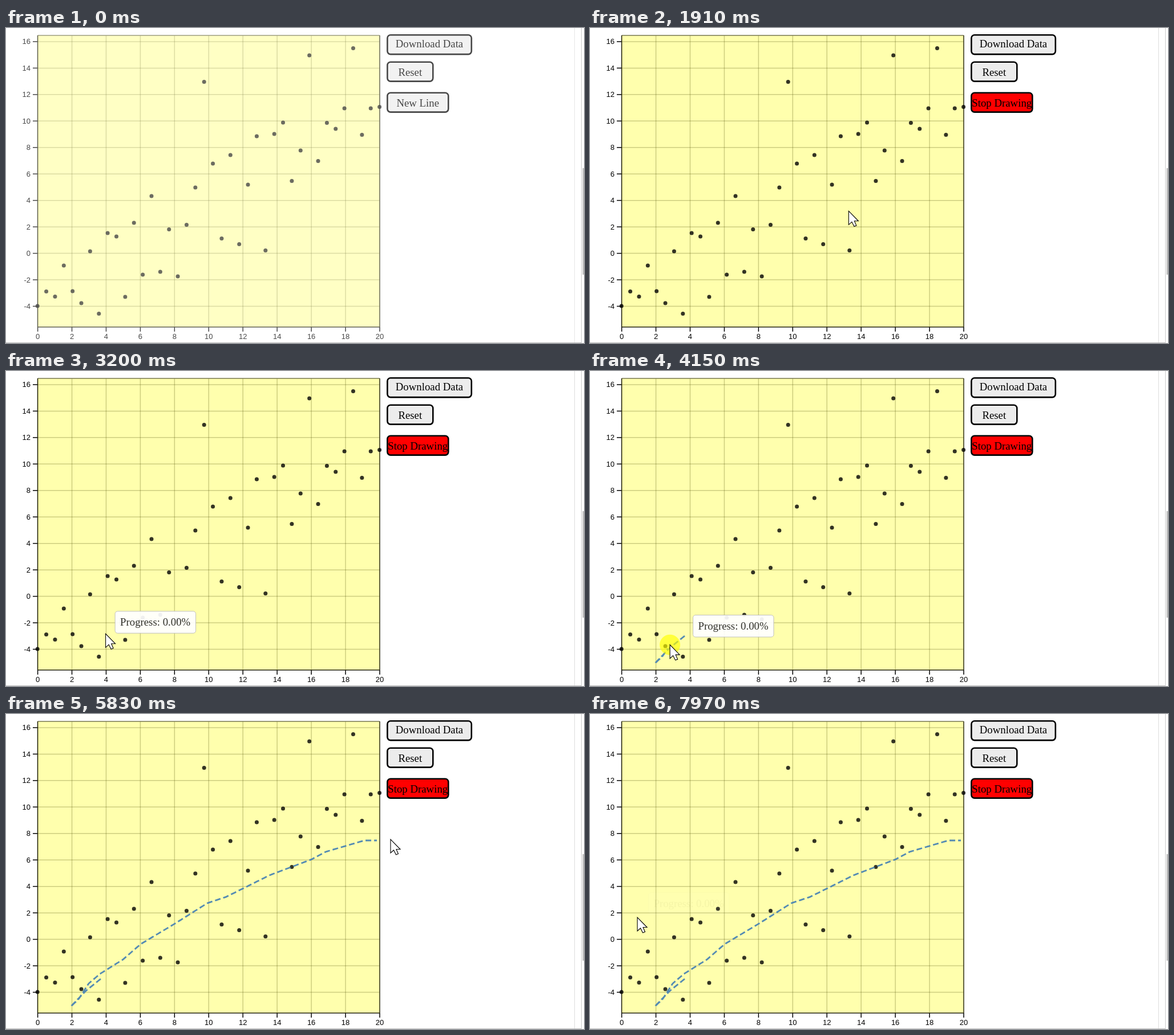
An HTML page for the animation above (8 s loop, 1013 by 553 pixels).

```html
<!DOCTYPE html>
<html lang="en">
<head>
<meta charset="utf-8">
<title>Draw a line</title>
<style>
  html, body { margin: 0; width: 100%; height: 100%; overflow: hidden; background: #fff; }
  svg { display: block; width: 100vw; height: 100vh; }
  .tick { font: 13px "Liberation Sans", Arial, sans-serif; }
  .label { font: 18.8px "Liberation Serif", "Times New Roman", serif; text-anchor: middle; }
</style>
</head>
<body>
<svg id="stage" viewBox="0 0 1013 553"></svg>
<script>
const LOOP = 8000;
const stage = document.getElementById('stage');

function add(tag, attrs, parent = stage, text) {
  const node = document.createElementNS('http://www.w3.org/2000/svg', tag);
  for (const key in attrs) node.setAttribute(key, attrs[key]);
  if (text !== undefined) node.textContent = text;
  parent.appendChild(node);
  return node;
}
const set = (node, key, value) => node.setAttribute(key, value);
const show = (node, on) => set(node, 'visibility', on ? 'visible' : 'hidden');
const mix = (a, b, k) => a + (b - a) * k;
const within = (t, a, b) => t >= a && t < b;
const ramp = (t, a, b) => Math.min(1, Math.max(0, (t - a) / (b - a)));
const easeIn = k => k * k;
const easeOut = k => 1 - (1 - k) ** 2;
const linear = k => k;

// Chart
const chart = add('g', {});
const LEFT = 55.5, RIGHT = 655, TOP = 13, BOTTOM = 525;
const xOf = v => 55.6 + v * 29.97;
const yOf = v => 395.6 - v * 23.23;
const line = (x1, y1, x2, y2, stroke = '#000', width = 1.5, parent = chart) =>
  add('line', { x1, y1, x2, y2, stroke, 'stroke-width': width }, parent);

add('rect', { x: LEFT, y: TOP, width: RIGHT - LEFT, height: BOTTOM - TOP, fill: '#ffffad' }, chart);
const GRID = 'rgba(70,70,0,.27)';
for (let v = 0; v <= 20; v += 2) {
  const x = xOf(v);
  line(x, TOP, x, BOTTOM, GRID);
  line(x, BOTTOM, x, 533);
  add('text', { x, y: 546, class: 'tick', 'text-anchor': 'middle' }, chart, v);
}
for (let v = -4; v <= 16; v += 2) {
  const y = yOf(v);
  line(LEFT, y, RIGHT, y, GRID);
  line(47, y, LEFT, y);
  add('text', { x: 43, y: y + 4.5, class: 'tick', 'text-anchor': 'end' }, chart, v);
}
line(LEFT, TOP, RIGHT, TOP, '#77774f');
line(RIGHT, TOP, RIGHT, BOTTOM, '#3a3a20');
line(LEFT, TOP, LEFT, BOTTOM, '#22220f');
line(LEFT, BOTTOM, RIGHT, BOTTOM, '#22220f');

// The plotted data: evenly spaced x, one measured y each
const heights = [
  488, 462.5, 471.5, 417, 462, 483, 392, 501.5, 360, 366, 472, 342, 433, 295,
  428, 353.5, 436, 345.5, 280, 94.5, 238, 369.5, 223, 379.5, 275, 190, 390.5,
  186, 166, 268.5, 215, 48, 233.5, 166.5, 177, 141, 35.5, 187.5, 141, 138.5
];
heights.forEach((cy, i) =>
  add('circle', { cx: xOf(i * 20 / 39) - 0.4, cy, r: 3.5, opacity: 0.8 }, chart));

const ink = add('polyline', {
  fill: 'none', stroke: '#4682b4', 'stroke-width': 2.8, 'stroke-dasharray': '10 5', opacity: 0.92
}, chart);

// Buttons
function button(y, width, label) {
  const box = add('rect', {
    x: 668.4, y: y + 1.3, width: width - 2.6, height: 33.8, rx: 5.5,
    fill: '#ececec', stroke: '#000', 'stroke-width': 2.6
  });
  const text = add('text', { x: 667 + width / 2, y: y + 23 + (y > 50 ? 2.5 : 0), class: 'label' }, stage, label);
  return { box, text };
}
button(11, 150, 'Download Data');
button(58.5, 82.5, 'Reset');
const toggle = button(112.5, 109.5, 'New Line');

// Page edges
line(996.5, 0, 996.5, 552, '#ddd', 1, stage);
const veil = add('rect', { width: 1008, height: 552, fill: '#fff' });
line(1008.5, 0, 1008.5, 553, '#ccc', 1, stage);
line(0, 552.5, 1008, 552.5, '#bbb', 1, stage);
add('rect', { x: 1010.5, y: 246, width: 2.5, height: 187, fill: '#bcbcbc' });

// Tooltip
const tip = add('g', {});
add('rect', { x: 0.5, y: 0.5, width: 141.5, height: 38.5, rx: 4.5, fill: '#fff', stroke: '#bbb' }, tip);
add('text', { x: 71, y: 26, class: 'label', fill: '#222' }, tip, 'Progress: 0.00%');

// Pointer
const halo = add('circle', { r: 18, fill: '#ff0', opacity: 0.65 });
const arrow = add('path', {
  d: 'M0 0V24L5.5 19 9.5 27 13.5 25.5 10 17.5H17Z',
  fill: '#fff', stroke: '#000', 'stroke-width': 1.1
});
const beam = add('path', {
  d: 'M-7 -11.5H-2L0 -10 2 -11.5H7M0 -10V10M-7 12H-2L0 10 2 12H7',
  fill: 'none', stroke: '#000', 'stroke-width': 2
});

// Hand-drawn stroke: down to the corner, back, then up across the chart
const DRAW = 3550, TURN = 4340, LIFT = 5720, LAG = 40;
const route = add('path', {
  d: 'M166 465L140 486 113 514 127 501 145 473 165 456 205 431 236 404 ' +
    '296 368 353 332 386 321 462 283 536 255 560 242 628 222 650 222',
  fill: 'none'
});
const routeLength = route.getTotalLength();
const drawn = t => ramp(t, DRAW, TURN) * 152 + ramp(t, TURN, LIFT - 300) * 0 +
  ramp(t, TURN, 4980) * 264 + ramp(t, 4980, LIFT) * (routeLength - 416);
function routePoint(length) {
  const p = route.getPointAtLength(length);
  return [p.x, p.y];
}

// Pointer moves: start, end, destination, easing
const BUTTON = [705, 138];
const moves = [
  [700, 1250, BUTTON, linear],
  [1520, 1910, [454, 321], easeIn],
  [1910, 2660, [222, 441], easeOut],
  [2660, DRAW, [166, 465], easeOut],
  [DRAW, LIFT, [650, 222], linear],
  [LIFT, 5830, [674, 220], linear],
  [6030, 6270, BUTTON, linear],
  [6520, 6780, [270, 400], linear],
  [6780, 7060, BUTTON, linear],
  [7710, 7970, [83, 357], linear]
];
function pointer(t) {
  if (within(t, DRAW, LIFT)) return routePoint(drawn(t));
  let at = [758, 315];
  for (const [start, end, to, ease] of moves) {
    if (t < start) break;
    const k = ease(ramp(t, start, end));
    at = at.map((v, i) => mix(v, to[i], k));
  }
  return at;
}

function render(t) {
  set(veil, 'opacity', 0.28 * (1 - ramp(t, 230, 600)));

  const [x, y] = pointer(t);
  for (const node of [halo, arrow, beam]) set(node, 'transform', `translate(${x} ${y})`);
  show(beam, within(t, 480, 1040));
  show(arrow, t >= 1040);
  const clicked = [1300, 6290, 7330].some(at => within(t, at, at + 110));
  show(halo, clicked || within(t, DRAW, LIFT));

  const active = within(t, 1370, 6330) || t >= 7390;
  set(toggle.box, 'fill', active ? '#f00' : '#ececec');
  toggle.text.textContent = active ? 'Stop Drawing' : 'New Line';

  const length = drawn(t - LAG), points = [];
  for (let d = 0; d < length; d += 3) points.push(routePoint(d));
  if (length > 0) points.push(routePoint(length));
  set(ink, 'points', points.join(' '));

  // The tooltip stays put while drawing
  const [hx, hy] = t < DRAW ? [x, y] : t < LIFT ? [164, 468] : [x + 3, y - 4];
  set(tip, 'transform', `translate(${hx + 16} ${hy - 40})`);
  set(tip, 'opacity', t < LIFT ? 0.93 * ramp(t, 2700, 2930) : 0.04 * ramp(t, 7900, 7970));
}

const start = performance.now();
function tick() {
  render((performance.now() - start) % LOOP);
  requestAnimationFrame(tick);
}
render(0);
requestAnimationFrame(tick);
</script>
</body>
</html>
```
